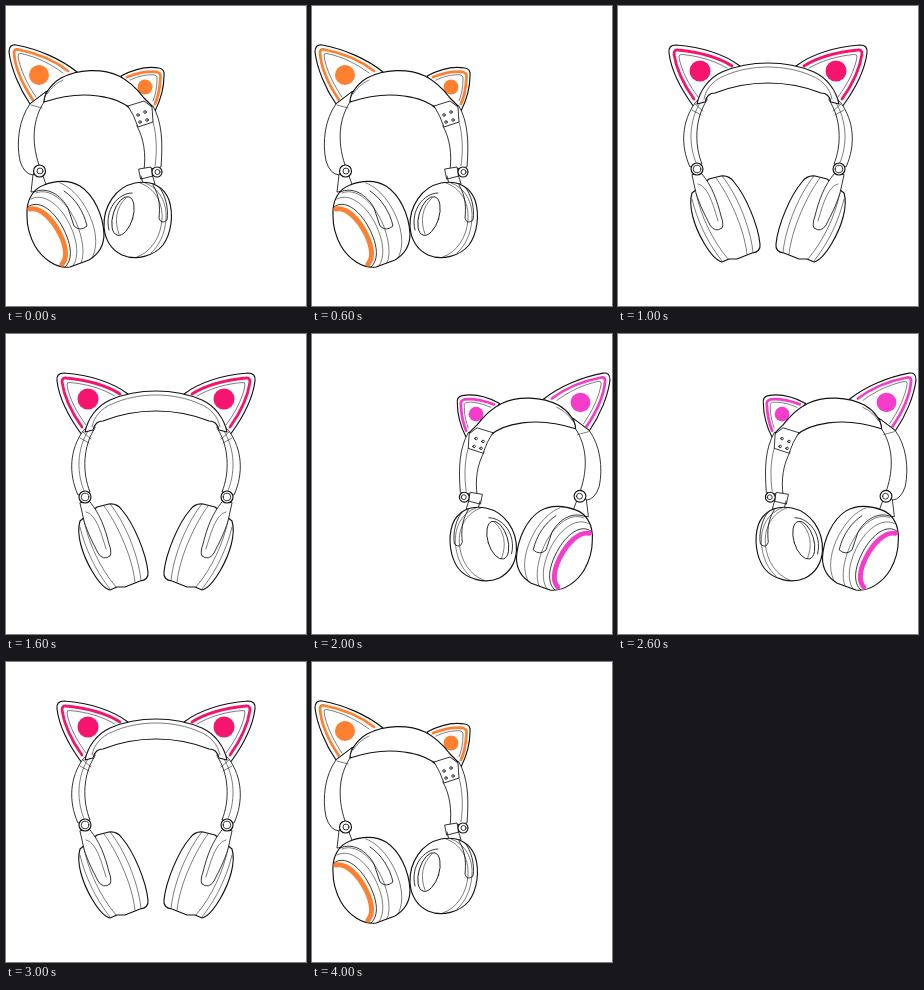
Animation, 300 px wide and 300 px high, one loop 4100 ms. Source, as an HTML page:

```html
<!DOCTYPE html>
<html>
<head>
<meta charset="utf-8">
<style>
html, body { margin: 0; height: 100%; overflow: hidden; background: #fff }
svg { display: block; width: 100vw; height: 100vh }
path, ellipse, circle { fill: #fff; stroke: #111; stroke-width: .85; stroke-linecap: round; stroke-linejoin: round }
.open { fill: none }
.bold { stroke-width: 1.15 }
.thin { fill: none; stroke-width: .55 }
.glow { fill: none; stroke: currentColor; stroke-width: 2.8 }
.badge { fill: currentColor; stroke: none }
</style>
</head>
<body>
<svg viewBox="0 0 300 300">
<defs>
  <g id="side">
    <!-- ears -->
    <path class="bold" d="M24 98C13 82 5 62 3 46Q3 38 10 39C32 43 55 53 71 66L40 86Z"/>
    <path class="glow" d="M27 94C17 79 9 61 8 47Q8 43 12 43.500C30 47 48 54 62 65"/>
    <path class="thin" d="M30 91C21 78 14 63 12 50Q12 47 15 47.500C31 51 45 58 57 67"/>
    <circle class="badge" cx="33" cy="69" r="10"/>
    <path class="bold" d="M115 70C128 63 142 60 153 62Q159 63 158 70C158 83 154 95 149 105L128 88Z"/>
    <path class="glow" d="M121 71C132 67 143 65 151 66Q155 67 154.500 71C154 82 152 91 149 98"/>
    <path class="thin" d="M124 74C133 70 142 68 149 69Q152 70 151 74C151 82 149 90 147 95"/>
    <circle class="badge" cx="139" cy="81" r="7.500"/>
    <!-- arms and band -->
    <path d="M24 98C13 113 10 136 14 155Q18 168 27 169L33 159C25 135 27 113 38 96L40 86Z"/>
    <path class="thin" d="M25 99L36 102"/>
    <path d="M131 120C138 133 140 148 138 164L155 161C157 136 156 116 147 100Z"/>
    <path class="thin" d="M147 116C151 130 151 146 149 160"/>
    <path class="bold" d="M38 96C38 88 45 78 55 72C72 63 96 62 113 70C123 75 132 84 138 92L146 100L126 104C119 97 108 92 92 90C71 87 53 91 38 96Z"/>
    <path class="thin" d="M41 88C45 82 50 77 57 74"/>
    <path d="M122 100L138 95L146 101L147 116L132 121Q128 109 122 100Z"/>
    <g class="thin">
      <circle cx="132" cy="109" r="1.300"/><circle cx="139" cy="106" r="1.300"/>
      <circle cx="134" cy="116" r="1.300"/><circle cx="141" cy="114" r="1.300"/>
    </g>
    <!-- hinges -->
    <path d="M27 169L25 186L42 184L37 170M135 170L137 178L149 178L146 168M133 163L145 161L147 170L135 173Z"/>
    <circle class="bold" cx="33.500" cy="165" r="6"/><circle cx="34" cy="165" r="3"/>
    <circle class="bold" cx="151" cy="166" r="5"/><circle cx="151.500" cy="166" r="2.500"/>
    <!-- far cup -->
    <path class="bold" d="M98 221C97 200 110 181 129 177C146 174 158 181 163 194C168 209 165 228 157 239C148 250 130 255 116 249C104 243 99 233 98 221Z"/>
    <path class="thin" d="M134 177C149 182 157 197 156 213C155 231 145 246 131 251M139 177C153 182 161 196 160 213C159 228 153 240 145 247"/>
    <path class="open" d="M147 179C154 190 154 202 153 212Q155 219 161 214C163 202 159 188 153 181"/>
    <path class="open" d="M103 224C98 204 112 187 126 187"/>
    <ellipse cx="117" cy="210" rx="10" ry="20" transform="rotate(17 117 210)"/>
    <path class="thin" d="M120 192C110 201 108 215 113 228"/>
    <!-- near cup -->
    <path class="bold" d="M21 210C20 194 27 183 38 179C50 174 64 174 74 180C88 189 97 209 98 228C98 240 93 248 83 254L64 261C50 263 36 252 29 240C24 231 21 220 21 210Z"/>
    <path class="thin" d="M25 193C38 186 55 200 64 219C72 236 73 251 67 260M30 187C44 181 61 196 70 216C77 232 79 248 75 257M54 177C70 183 83 203 88 222C91 235 90 244 86 252"/>
    <path class="open" d="M22 201C32 193 47 203 57 222C66 239 67 254 59 261M28 186C41 180 55 189 62 202L68 220Q74 226 81 220C78 206 69 192 58 185"/>
    <path class="glow" style="stroke-width:5" d="M24 203C34 201 46 212 54 228C61 242 61 253 56 258"/>
  </g>
  <g id="half">
    <!-- ear -->
    <path class="bold" d="M76 101C62 82 53 63 51 47Q50 39 58 39C82 41 106 48 122 60L90 88Z"/>
    <path class="glow" d="M76 93C66 79 58 62 56 48Q56 43.500 60 44C80 46 100 51 114 60"/>
    <path class="thin" d="M80 91C71 79 63 64 61 51Q61 48 64 48.500C80 50 95 54 109 62"/>
    <circle class="badge" cx="82" cy="65" r="10.500"/>
    <!-- arm -->
    <path d="M77 97C64 115 62 139 72 161L84 158C76 138 77 112 89 94L88 86Z"/>
    <path class="thin" d="M82 97C71 115 70 139 79 159M77 98L85 105M74 104L83 109"/>
    <!-- cup -->
    <path class="bold" d="M74 187C70 200 76 220 86 237Q96 254 104 256L111 253L119 253L134 247Q143 246 142 238C140 219 128 190 116 176Q111 169 103 170L91 173Z"/>
    <path class="thin" d="M74 193C79 214 89 236 104 255M78 187C83 210 94 234 110 253M98 172C110 188 126 221 129 248M104 170C118 187 132 219 135 246"/>
    <path d="M74 169L78 187C82 200 87 209 92 219Q97 227 104 222Q106 218 103 210C99 194 94 180 84 168Z"/>
    <path class="thin" d="M80 178C89 180 94 194 100 215"/>
    <circle class="bold" cx="79" cy="163" r="6"/><circle cx="79" cy="163" r="3.800"/>
  </g>
</defs>
<g class="view" color="#ff8030"><use href="#side"/></g>
<g class="view" color="#f5146e">
  <use href="#half"/><use href="#half" transform="matrix(-1 0 0 1 300 0)"/>
  <path class="bold" d="M79 98C82 84 91 72 104 66C118 60 135 57 150 57S182 60 196 66C209 72 218 84 221 98L213 96Q211 87 203 87C188 81 169 77 150 77S112 81 97 87Q89 87 87 96Z"/>
  <path class="thin" d="M86 93C88 82 96 74 106 70C119 64 135 61 150 61S181 64 194 70C204 74 212 82 214 93"/>
</g>
<g class="view" color="#f53ccb"><use href="#side" transform="matrix(-.985 0 0 .977 301 1)"/></g>
</svg>
<script>
const views = document.querySelectorAll('.view');
const order = [0, 1, 2, 1, 0];

function draw(now) {
  const shown = order[Math.floor(now % 4100 / 1000)];
  views.forEach((view, i) => view.style.display = i === shown ? '' : 'none');
  requestAnimationFrame(draw);
}
draw(performance.now());
</script>
</body>
</html>
```
